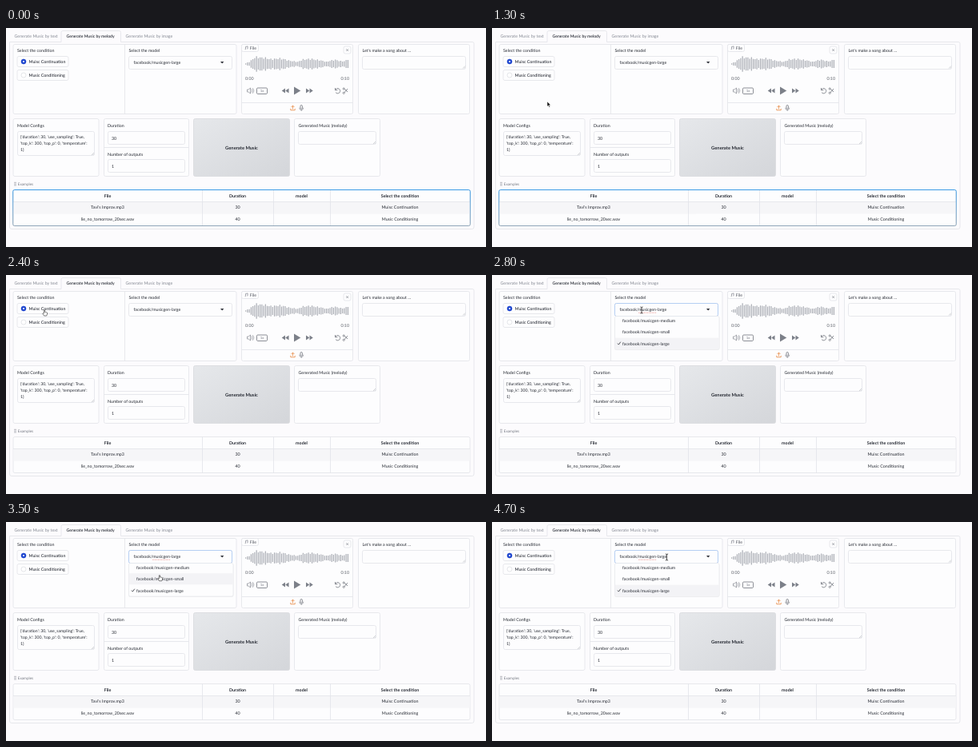
Animation of 600x274 px, one loop 5000 ms. Source, as an HTML page:

```html
<!DOCTYPE html>
<html lang="en">
<head>
<meta charset="utf-8">
<title>Music generator</title>
<style>
html, body { margin: 0; width: 100%; height: 100%; overflow: hidden; background: #fcfbfd; }
svg { display: block; width: 600px; height: 274px; }
text { font-family: Lato, "Open Sans", sans-serif; font-size: 5.3px; fill: #262a33; text-rendering: geometricPrecision; white-space: pre; }
.mute { fill: #858993; }
.bold { font-weight: 700; }
.mid { text-anchor: middle; }
</style>
</head>
<body>
<svg id="stage" viewBox="0 0 600 274">
  <defs>
    <linearGradient id="metal" x2="1" y2="1">
      <stop stop-color="#e6e8eb"/><stop offset="1" stop-color="#d4d6da"/>
    </linearGradient>
    <linearGradient id="focus" x2="0" y2="1">
      <stop stop-color="#3c9be6"/><stop offset="1" stop-color="#8fa6b8"/>
    </linearGradient>
  </defs>
</svg>
<script>
const stage = document.getElementById('stage');
const LINE = '#e3e4e9', GREY = '#6f737c', BLUE = '#1d45cf';

function add(tag, attrs, parent = stage) {
  const el = document.createElementNS('http://www.w3.org/2000/svg', tag);
  for (const key in attrs) el.setAttribute(key, attrs[key]);
  return parent.appendChild(el);
}
const box = (x, y, x2, y2, attrs, parent) =>
  add('rect', { x, y, width: x2 - x, height: y2 - y, rx: 2, fill: '#fdfdfe', stroke: LINE, 'stroke-width': .8, ...attrs }, parent);
const path = (d, attrs, parent) =>
  add('path', { d, fill: 'none', stroke: LINE, 'stroke-width': .8, ...attrs }, parent);
const text = (x, y, string, attrs, parent) => {
  const el = add('text', { x, y, ...attrs }, parent);
  el.textContent = string;
  return el;
};

// Tabs and outer frame
path('M4.5 17.5V249Q4.5 251.5 7 251.5H582.5Q585 251.5 585 249V19.5Q585 17.5 583 17.5H143.5V5.5Q143.5 3.5 141.5 3.5H71Q69 3.5 69 5.5V17.5H4.5');
text(10.5, 12, 'Generate Music by text', { class: 'mute' });
text(75.5, 12, 'Generate Music by melody', { style: 'font-weight:600;font-size:5.1px' });
text(149.5, 12, 'Generate Music by image', { class: 'mute' });

// Panels
[[9, 20.5, 288, 107.5], [294.5, 20.5, 433.5, 107.5], [440.5, 20.5, 579.5, 107.5],
 [9, 113.5, 116, 185.5], [122.5, 113.5, 228.5, 185.5], [360.5, 113.5, 467.5, 185.5]].forEach(p => box(...p));
path('M148.5 20.5V107.5M294.5 93.5H433.5M122.5 149.5H228.5');
[[14.5, 129.5, 110.5, 159.5], [127.5, 129.5, 223.5, 145.5], [127.5, 164.5, 223.5, 180.5],
 [365.5, 129.5, 462.5, 145.5], [445.5, 35.5, 574.5, 51.5], [153.5, 35.5, 282.5, 51.5]].forEach(p => box(...p));
[[110, 159], [462, 145], [574, 50.5]].forEach(([x, y]) =>
  path(`M${x - 3} ${y}l3-3M${x - 1.3} ${y}l1.3-1.3`, { stroke: '#a5a8b0', 'stroke-width': .5 }));
box(234.5, 113.5, 354.5, 185.5, { fill: 'url(#metal)', stroke: '#d8dade' });
text(294.5, 152, 'Generate Music', { class: 'bold mid', style: 'font-size:5.8px' });

[[14, 29.5, 'Select the condition'], [153.5, 29.5, 'Select the model'],
 [445.5, 29.5, 'Let\'s make a song about ...'], [14, 123.5, 'Model Configs'],
 [127, 123.5, 'Duration'], [127, 159.5, 'Number of outputs'],
 [365.5, 123.5, 'Generated Music (melody)'], [132, 139.5, '30'], [132, 174.7, '1'],
 [159.5, 45.3, 'facebook/musicgen-large']].forEach(t => text(...t));
['{\'duration\': 30, \'use_sampling\': True,', '\'top_k\': 300, \'top_p\': 0, \'temperature\':', '1}']
  .forEach((line, i) => text(18, 138 + 8 * i, line, { style: 'font-size:5.2px' }));
path('M268 42h4.4l-2.2 2.6Z', { fill: '#30333b', stroke: 'none' });

// Radio buttons
['Muisc Continuation', 'Music Conditioning'].forEach((label, i) => {
  const y = 42 + 17 * i;
  box(14, y - 6.5, 78, y + 6.5);
  add('circle', { cx: 22, cy: y, r: 3, fill: i ? '#fff' : BLUE, stroke: i ? '#d3d5db' : BLUE, 'stroke-width': .6 });
  if (!i) add('circle', { cx: 22, cy: y, r: 1.1, fill: '#fff' });
  text(28.5, y + 1.8, label, { style: 'font-weight:500' });
});

// Audio player
box(294.5, 20.5, 315.5, 29.5);
text(309, 26.8, 'File', { class: 'mid', style: 'fill:#50545d' });
path('M299.5 26.5v-3l2.6-.6v3M298.7 26.6h.8M301.3 26h.8', { stroke: GREY, 'stroke-width': .6 });
box(422, 23, 431, 32);
path('M425.2 26.2l2.8 2.8m0-2.8l-2.8 2.8', { stroke: GREY, 'stroke-width': .6 });

const envelope = [1, 4, 10, 9, 9, 7, 7, 8, 7, 5, 4, 3, 6, 7, 7, 6, 5, 3, 5, 6, 4, 4, 9];
let wave = '';
for (let i = 0; i < 58; i++) {
  const at = i / 58 * (envelope.length - 1), k = Math.floor(at);
  const level = envelope[k] + (envelope[k + 1] - envelope[k]) * (at - k);
  const h = level * (.86 + .14 * Math.sin(i * 2.4));
  wave += `M${299.7 + i * 2.24} ${45 - h}v${2 * h}`;
}
path(wave, { stroke: '#a3a6ae', 'stroke-width': 1.1 });
text(299, 65, '0:00', { style: 'fill:#5c6069' });
text(429, 65, '0:10', { style: 'fill:#5c6069;text-anchor:end' });

const icon = (d, attrs) => path(d, { stroke: GREY, ...attrs });
icon('M301.5 77h1.7l2.3-2v7l-2.3-2h-1.7ZM307 76.5q1.4 2 0 4M308.5 75.3q2.4 3.2 0 6.4', { 'stroke-width': .6 });
box(313.5, 75, 326.5, 82.5, { rx: 1.2, stroke: GREY });
text(320, 80.3, '1x', { class: 'mid', style: 'font-size:4.3px;fill:#6f737c' });
icon('M349 75.5v6l-4.3-3ZM353.5 75.5v6l-4.3-3ZM360 73.5v10l8.3-5ZM375 75.5v6l4.3-3ZM379.5 75.5v6l4.3-3Z', { fill: '#7c8089', stroke: 'none' });
icon('M411.5 75v2.8h2.8M411.7 77.6a3.1 3.1 0 1 1 .4 3');
icon('M422 75l5 5M422 82l5-6');
[76, 81.3].forEach(cy => add('circle', { cx: 422.2, cy, r: 1.1, fill: '#fff', stroke: GREY, 'stroke-width': .7 }));
icon('M358.5 101.5v-4.5m-2 2l2-2l2 2M355.8 100.8v2h5.4v-2', { stroke: '#e88a45' });
box(368, 96.5, 370.4, 101.3, { rx: 1.2, stroke: GREY });
icon('M366.7 99.7q0 2.9 2.5 2.9t2.5-2.9M369.2 102.6v1.4', { 'stroke-width': .6 });

// Examples table
icon('M10 193.3h3M10 195.1h3M10 196.9h3', { 'stroke-width': .5 });
text(14.7, 197, 'Examples', { style: 'font-size:4.7px;fill:#747882' });
box(9, 202.5, 580, 247.5);
add('rect', { x: 9.3, y: 217.5, width: 570.4, height: 15, fill: '#f6f6f8' });
const rowGlow = add('rect', { x: 9.3, y: 233, width: 570.4, height: 14, fill: '#fdf1e8' });
path('M9 217.5H580M245.5 202.5V247.5M334.5 202.5V247.5M405.5 202.5V247.5');
[['File', 'Duration', 'model', 'Select the condition'],
 ['Tavi\'s Improv.mp3', '30', '', 'Muisc Continuation'],
 ['lie_no_tomorrow_20sec.wav', '40', '', 'Music Conditioning']].forEach((row, r) =>
  row.forEach((cell, c) => text([127, 289.5, 369.5, 492.5][c], [211.8, 226.3, 241.3][r], cell,
    { class: r ? 'mid' : 'mid bold', style: 'font-size:5.35px' })));
const ring = box(8.7, 202.5, 580.3, 247.5, { fill: 'none', stroke: 'url(#focus)', 'stroke-width': 1 });

// Open model list
const menu = add('g');
box(153.5, 35.5, 282.5, 51.5, { fill: 'none', stroke: '#a9c9f4' }, menu);
path('M183 47.2h22.5', { stroke: '#e57368', 'stroke-width': .6, 'stroke-dasharray': '.9 .5' }, menu);
box(153, 52, 284.5, 94, { fill: '#000', stroke: 'none', opacity: .05 }, menu);
box(153.5, 51.5, 284, 93, { stroke: '#e9eaee' }, menu);
const hover = add('rect', { x: 153.8, width: 129.9, height: 14, fill: '#f3f3f6' }, menu);
['medium', 'small', 'large'].forEach((size, i) =>
  text(163, 59.3 + 14.1 * i, 'facebook/musicgen-' + size, {}, menu));
path('M157 85.6l1.3 1.5l2.5-3.4', { stroke: '#30333b' }, menu);

// Pointers, each drawn around its hot spot
const pointers = {
  arrow: path('M0 0V6.2L1.5 4.9L2.5 7.2L3.5 6.8L2.5 4.5H4.5Z', { fill: '#111', stroke: '#fff', 'stroke-width': .5 }),
  hand: path('M-.7 .9Q0 .1 .6 .9V3.1Q1.4 2.7 1.8 3.3Q2.5 2.9 2.8 3.6Q3.6 3.4 3.6 4.4Q3.6 6.2 2.7 7.7H-.4Q-1.2 6.3-2.3 5.1Q-2-4.2-.7 4.9Z'.replace('-2-4.2', '-2 4.2'),
    { fill: '#fff', stroke: '#222', 'stroke-width': .6 }),
  beam: path('M-1.6-4Q0-4 0-3V3Q0 4-1.6 4M1.6-4Q0-4 0-3M1.6 4Q0 4 0 3', { stroke: '#222' })
};

// time, x, y, pointer shape from then on
const track = [
  [500, 125, 225, 'hand'], [600, 125, 211, 'arrow'], [1000, 125, 211, 'arrow'],
  [1300, 69, 92, 'arrow'], [1400, 65, 80, 'arrow'], [1500, 65, 80, 'arrow'],
  [1700, 50, 52, 'hand'], [1900, 48, 43.3, 'hand'], [2400, 48, 43.3, 'hand'],
  [2500, 80, 46, 'arrow'], [2700, 178, 44, 'beam'], [2800, 187, 44, 'beam'],
  [3100, 187, 44, 'beam'], [3200, 188, 53, 'hand'], [3500, 192, 66, 'hand'],
  [3700, 193, 72, 'hand'], [3900, 194, 84, 'hand'], [4100, 194, 84, 'hand'],
  [4400, 204, 60, 'hand'], [4500, 212, 47, 'beam'], [4700, 218.5, 44, 'beam'], [5000, 218.5, 44, 'beam']
];
const show = (el, on) => el.setAttribute('visibility', on ? 'visible' : 'hidden');

function draw(t) {
  const i = track.findIndex(key => key[0] > t) - 1;
  for (const kind in pointers) show(pointers[kind], i >= 0 && track[i][3] === kind);
  if (i >= 0) {
    const [t0, x0, y0, kind] = track[i], [t1, x1, y1] = track[i + 1];
    const p = (t - t0) / (t1 - t0);
    pointers[kind].setAttribute('transform', `translate(${x0 + (x1 - x0) * p} ${y0 + (y1 - y0) * p})`);
  }
  show(rowGlow, t === 500);
  show(ring, t < 1900);
  show(menu, t >= 2800);
  hover.setAttribute('y', t >= 3300 && t < 3800 ? 64.3 : 78.6);
}

const start = performance.now();
function tick(now) {
  draw(Math.floor(Math.max(0, now - start) % 5000 / 100) * 100);
  requestAnimationFrame(tick);
}
tick(start);
</script>
</body>
</html>
```
